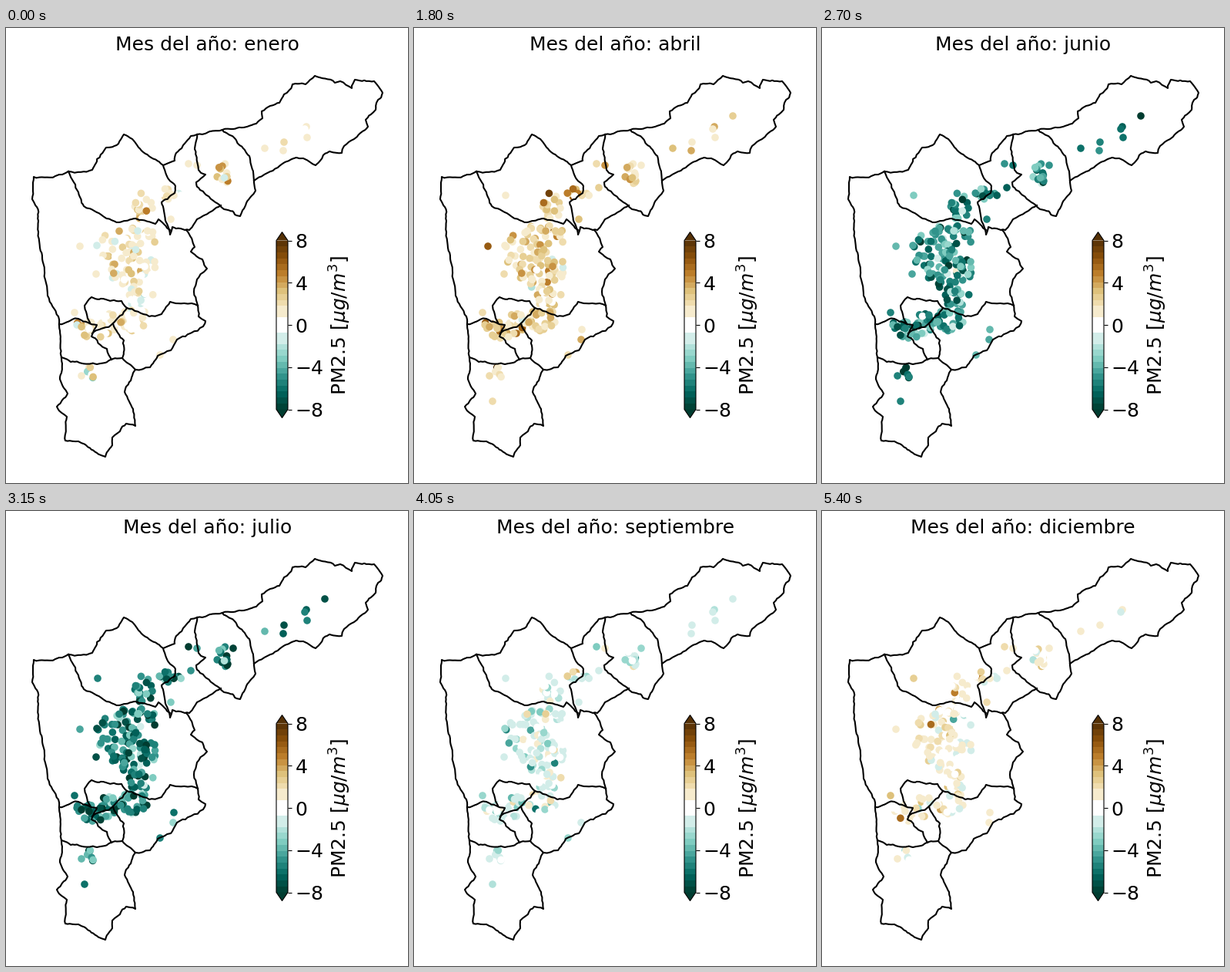
Animation of 522x590 px, one loop 5850 ms. Source, as a matplotlib script:

```python
import numpy as np
import matplotlib.pyplot as plt
from matplotlib.animation import FuncAnimation
from matplotlib.colors import BoundaryNorm, ListedColormap
from matplotlib.patches import Polygon, Rectangle

W, H, DPI = 522, 590, 100
SLOT_MS = 450
MONTHS = ("enero", "febrero", "marzo", "abril", "mayo", "junio", "julio", "agosto",
          "septiembre", "octubre", "noviembre", "diciembre")
MEAN = (1.0, 8.8, 10.5, 2.3, -2.7, -4.8, -5.6, -4.0, -0.9, -1.2, -2.4, 0.6)

rng = np.random.default_rng(12)
plt.rcParams["font.family"] = "DejaVu Sans"
fig = plt.figure(figsize=(W / DPI, H / DPI), dpi=DPI, facecolor="white")
ax = fig.add_axes([0, 0, 1, 1])
ax.set(xlim=(0, W), ylim=(H, 0))
ax.axis("off")

# Colour scale: a wide white centre, then even steps up to +-8
steps = np.r_[0.7, np.linspace(1.8, 8, 12)]
bounds = np.r_[-steps[::-1], steps]
middles = (bounds[:-1] + bounds[1:]) / 2
brbg = plt.get_cmap("BrBG_r")
shades = [brbg(0.5 + m / 16) if abs(m) > 0.5 else (1, 1, 1, 1) for m in middles]
cmap = ListedColormap(shades).with_extremes(under=brbg(0.0), over=brbg(1.0))
norm = BoundaryNorm(bounds, cmap.N)


def ragged(a, b):
    """Split a segment at displaced midpoints until the pieces are short."""
    length = np.hypot(*(b - a))
    if length < 5:
        return [b]
    middle = (a + b) / 2 + rng.normal(0, 0.06 * min(length, 14), 2)
    return ragged(a, middle) + ragged(middle, b)


def border(*corners):
    corners = np.array(corners, float)
    line = [corners[0]]
    for a, b in zip(corners, corners[1:]):
        line += ragged(a, b)
    ax.plot(*np.transpose(line), color="black", lw=1.5, zorder=3,
            solid_joinstyle="round")


# North-eastern districts
border((281, 132), (325, 124), (333, 117), (332, 108), (343, 101), (355, 97), (361, 86),
       (372, 73), (389, 73), (401, 62), (427, 71), (434, 69), (449, 78), (453, 67),
       (478, 69), (489, 84), (481, 97), (480, 106), (467, 119), (470, 128), (452, 144),
       (439, 153), (436, 162), (420, 160), (402, 178), (386, 169), (377, 168), (322, 198))
border((322, 198), (316, 166), (297, 143), (281, 132), (248, 138), (245, 157), (250, 184),
       (259, 190), (247, 200), (252, 210), (283, 235), (304, 244), (312, 227), (324, 211),
       (322, 198))
border((248, 138), (240, 140), (230, 152), (221, 162), (219, 172), (204, 178), (208, 190),
       (220, 205), (219, 214), (202, 226), (213, 268), (216, 258), (238, 262), (248, 248),
       (279, 230))
# North-western and central districts
border((81, 186), (112, 184), (117, 175), (130, 155), (146, 150), (153, 138), (164, 144),
       (181, 163), (204, 178))
border((81, 186), (94, 213), (101, 231), (147, 252), (168, 247), (194, 254), (198, 248),
       (213, 262))
border((81, 186), (64, 192), (36, 193), (34, 222), (40, 232), (44, 285), (54, 347),
       (68, 374), (69, 384))
border((234, 262), (245, 284), (240, 290), (255, 300), (261, 312), (248, 326), (244, 342),
       (249, 360))
border((249, 360), (241, 357), (213, 355), (202, 371), (186, 374), (157, 363), (150, 354),
       (111, 349), (102, 360), (109, 382))
# Southern districts
border((69, 384), (94, 377), (118, 385), (111, 400), (131, 416), (137, 430))
border((157, 363), (139, 383), (112, 396))
border((139, 383), (153, 405), (151, 428))
border((249, 360), (250, 374), (259, 380), (256, 387), (222, 404), (214, 418), (197, 425),
       (187, 440), (168, 443), (151, 428), (118, 436), (84, 433), (72, 427))
border((69, 384), (72, 427), (71, 458), (80, 474), (66, 491), (79, 504), (77, 535),
       (94, 536), (129, 556), (138, 541), (138, 531), (156, 513), (168, 516), (165, 494),
       (154, 472), (168, 443))


def cluster(x, y, rx, ry, n):
    """Sensors spread evenly over an ellipse."""
    angle, radius = rng.uniform(0, 2 * np.pi, n), np.sqrt(rng.uniform(0, 1, n))
    return np.c_[x + rx * radius * np.cos(angle), y + ry * radius * np.sin(angle)]


lone = [(414, 114), (390, 128), (388, 131), (391, 142), (361, 148), (360, 159), (336, 156),
        (237, 176), (248, 178), (295, 178), (240, 207), (214, 248), (119, 217), (96, 283),
        (117, 319), (193, 303), (89, 369), (218, 391), (217, 404), (200, 424), (102, 484),
        (98, 451)]
crowd = np.vstack([
    cluster(283, 190, 9, 16, 14),
    cluster(213, 216, 17, 9, 13),
    cluster(178, 232, 12, 20, 19),
    cluster(128, 284, 11, 28, 14),
    cluster(168, 272, 28, 20, 36),
    cluster(164, 313, 30, 26, 56),
    cluster(173, 349, 20, 12, 16),
    cluster(106, 390, 16, 19, 20),
    cluster(132, 389, 14, 20, 22),
    cluster(165, 378, 20, 15, 24),
    cluster(110, 448, 5, 12, 7),
])
stations = np.vstack([crowd, lone])

# Each sensor keeps its own bias; heavy tails give a few odd readings per month.
scale = np.r_[np.full(len(crowd), 1.0), np.full(len(lone), 0.7)]
bias = 0.5 * rng.normal(size=len(stations))
values = [m + scale * (bias + (1 + 0.08 * abs(m)) * rng.standard_t(5, len(stations)))
          for m in MEAN]

dots = ax.scatter(*stations.T, c=values[0], cmap=cmap, norm=norm, s=48, linewidths=0,
                  zorder=2)
title = ax.text(261.3, 29, "", fontsize=18, ha="center", va="baseline")

# Colour bar
LEFT, RIGHT, TOP, BOTTOM, TIP = 351, 366, 275.6, 494.5, 11
MID = (LEFT + RIGHT) / 2


def bar_y(value):
    return TOP + (8 - value) / 16 * (BOTTOM - TOP)


for low, high, shade in zip(bounds, bounds[1:], shades):
    ax.add_patch(Rectangle((LEFT, bar_y(high)), RIGHT - LEFT, bar_y(low) - bar_y(high),
                           fc=shade, lw=0, antialiased=False))
for edge, tip, shade in ((TOP, TOP - TIP, brbg(1.0)), (BOTTOM, BOTTOM + TIP, brbg(0.0))):
    ax.add_patch(Polygon([(LEFT, edge), (MID, tip), (RIGHT, edge)], fc=shade, lw=0))
ax.add_patch(Polygon([(LEFT, TOP), (MID, TOP - TIP), (RIGHT, TOP), (RIGHT, BOTTOM),
                      (MID, BOTTOM + TIP), (LEFT, BOTTOM)],
                     fill=False, ec="black", lw=0.8, joinstyle="bevel"))
for tick in range(-8, 9, 4):
    y = bar_y(tick)
    ax.plot([RIGHT, RIGHT + 4.9], [y, y], color="black", lw=0.8, solid_capstyle="butt")
    ax.text(RIGHT + 9.7, y, str(tick).replace("-", "\u2212"), fontsize=18,
            va="center_baseline")
ax.text(418.1, bar_y(0), r"PM2.5 [$\mu g/m^3$]", fontsize=18, rotation=90,
        rotation_mode="anchor", ha="center", va="top")


def update(slot):
    month = max(slot - 1, 0)  # January lasts two slots
    dots.set_array(values[month])
    title.set_text("Mes del año: " + MONTHS[month])
    return dots, title


anim = FuncAnimation(fig, update, frames=len(MONTHS) + 1, interval=SLOT_MS,
                     repeat=True, repeat_delay=0, blit=False)
plt.show()
```
